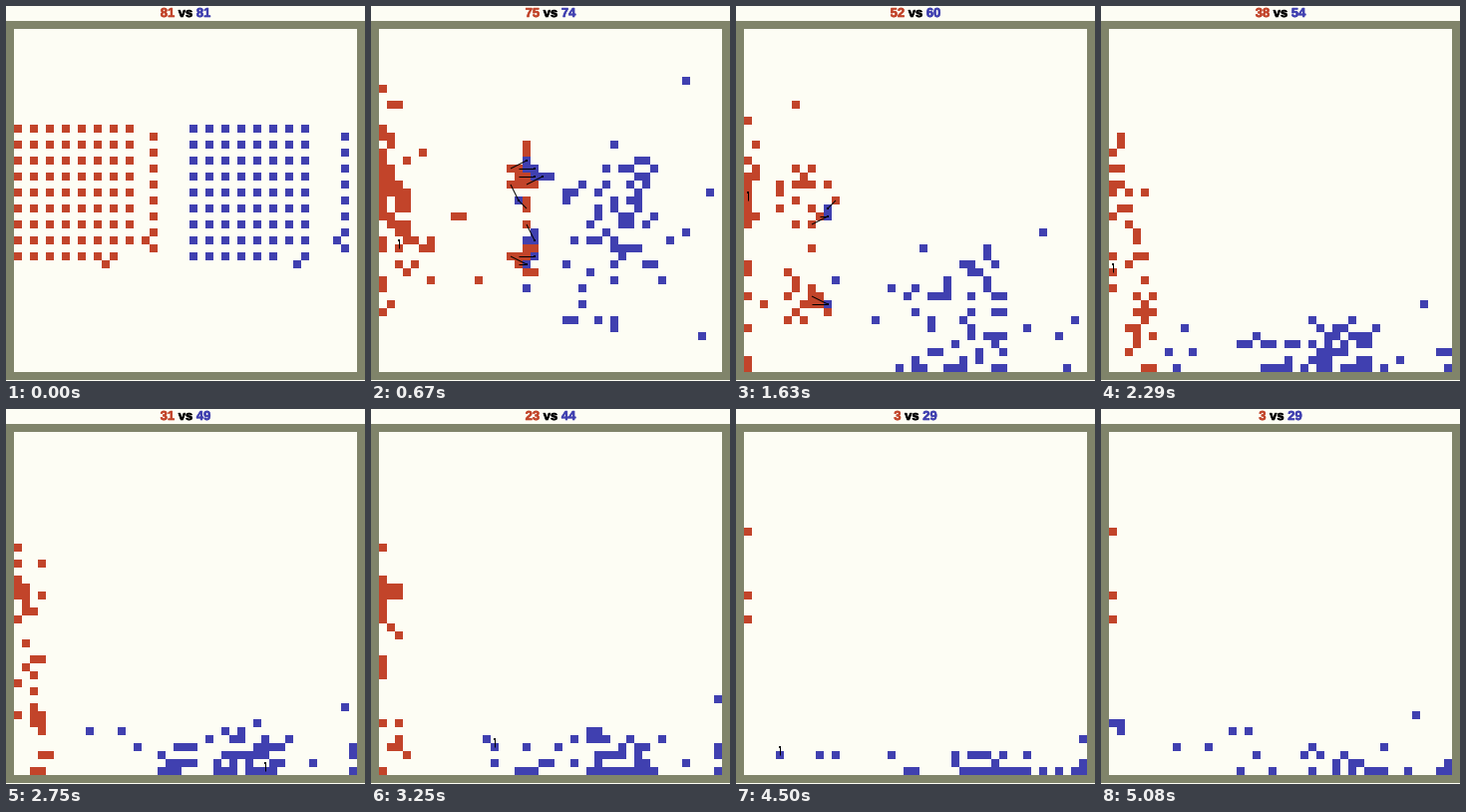
A matplotlib script that plays this animation: 360x376 px, repeating every 5120 ms.

```python
import math
import random

import matplotlib.pyplot as plt
import numpy as np
from matplotlib import patheffects
from matplotlib.animation import FuncAnimation
from matplotlib.collections import LineCollection
from matplotlib.colors import to_rgb
from matplotlib.patches import Rectangle

W, H, DPI = 360, 376, 100
CELL, GRID, LEFT, TOP = 8, 43, 8, 23
RED, BLUE, PAPER, WALL = "#c2442a", "#4040b0", "#fdfdf4", "#80846a"
FRAMES, INTERVAL = 256, 20
TICK, LAST = 1000 / 24, 122
rng = random.Random(11)

# Course of the battle at a few key ticks
KEYS = [0, 16, 39, 55, 78, 94, 108, 122]


def course(*values):
    return lambda t: float(np.interp(t, KEYS, values))


# Front line: centre of its upper and lower wing, and spread
FRONT_X = course(17, 17.4, 7.6, 4.3, 2, 2.5, 2, 0)
FRONT_Y = (course(18, 19.5, 21, 37, 39.5, 41.4, 41, 38),
           course(26, 28, 32.5, 40, 40.5, 41.6, 41, 39))
FRONT_SX = course(0.8, 0.8, 1.4, 1, 1, 1.1, 1, 1.2)
FRONT_SY = course(2.3, 2.3, 2, 2, 1.5, 0.5, 1, 2.5)


class Army:
    """Units in order of death; the next few fight, the others keep to camp."""

    def __init__(self, start, side, left, fighters, camp, stand=()):
        start = sorted(start, key=lambda p: side * p[0] + rng.gauss(0, 1))
        self.left, self.fighters, self.camp, self.side = left, fighters, camp, side
        self.pos = start
        self.wing = [int(y > 20) for x, y in start]
        xy = np.array(start, float)
        z = (xy - xy.mean(0)) / xy.std(0)
        self.bias = [(0.6 * a + rng.gauss(0, 0.8), 0.6 * b + rng.gauss(0, 0.8))
                     for a, b in z]
        self.post = dict(zip(range(len(start) - len(stand), len(start)), stand))

    def first(self, t):
        return len(self.pos) - round(self.left(t))

    def alive(self, t):
        return self.pos[self.first(t):]

    def goal(self, i, t):
        """Where unit i wants to be, and its urge to roam."""
        gx, gy = self.bias[i]
        if i - self.first(t) < self.fighters(t):
            x = FRONT_X(t) + 1.5 * (self.side > 0) + FRONT_SX(t) * gx
            return x, FRONT_Y[self.wing[i]](t) + FRONT_SY(t) * gy, 0
        cx, cy, sx, sy = (f(t) for f in self.camp)
        y = self.post.get(i, cy + sy * gy)
        return cx + sx * gx, y, 0.2 * min(1, sx)


def clamp(v):
    return min(GRID - 1, max(0, round(v)))


def sign(v):
    return (v > 0) - (v < 0)


def phalanx(x0, last, gap, loose):
    """Nine by nine block whose last column and one corner have just set off."""
    block = [(x0 + 2 * i, 12 + 2 * j) for i in range(8) for j in range(9)]
    block.remove((x0 + gap, 28))
    block += [(last, 13 + 2 * j) for j in range(8)]
    return block + [(last - 1, 26), (x0 + loose, 29)]


red = Army(
    phalanx(0, 17, 14, 11), -1,
    left=course(81, 75, 52, 38, 23, 11, 3, 3),
    fighters=course(24, 24, 34, 16, 9, 7, 0, 0),
    camp=(course(2, 2, 0, 2.5, 0.6, 0, 0, 0),
          course(21, 22, 26, 21, 25, 20, 18, 18),
          course(3, 2.8, 0.4, 2.8, 1.2, 0, 0, 0),
          course(6, 6.5, 10, 5, 7, 6, 6, 6)),
    stand=(29, 12, 20, 23))
blue = Army(
    phalanx(22, 41, 12, 13), 1,
    left=course(81, 74, 60, 54, 44, 31, 29, 29),
    fighters=course(15, 15, 7, 6, 3, 3, 5, 10),
    camp=(course(31, 28.5, 26, 25, 25, 27, 25, 23),
          course(20, 25.5, 39, 41, 41, 42, 42, 42),
          course(6, 5, 6, 7.5, 9, 9.5, 9.5, 9.5),
          course(5.5, 7, 4, 2.6, 2.3, 1.3, 1.3, 1.3)))


def advance(t):
    """Move every living unit by at most one cell, never onto another."""
    taken = set(red.alive(t) + blue.alive(t))
    queue = [(a, i) for a in (red, blue) for i in range(a.first(t), len(a.pos))]
    rng.shuffle(queue)
    for army, i in queue:
        x, y = army.pos[i]
        gx, gy, roam = army.goal(i, t)
        dx, dy = sign(clamp(gx) - x), sign(clamp(gy) - y)
        if rng.random() < roam:
            dx, dy = rng.randint(-1, 1), rng.randint(-1, 1)
        for step in ((dx, dy), (dx, 0), (0, dy)):
            cell = clamp(x + step[0]), clamp(y + step[1])
            if cell not in taken:
                taken.remove((x, y))
                taken.add(cell)
                army.pos[i] = cell
                break


def centre(p):
    return LEFT + CELL * (p[0] + 0.5), TOP + CELL * (p[1] + 0.5)


def strikes(t, reds, blues):
    """Thin strokes between opponents within reach, now and then a stray one."""
    out = []
    for r in reds:
        near = [b for b in blues if math.dist(r, b) < 2.3]
        if near and rng.random() < 0.4:
            out.append((centre(r), centre(rng.choice(near))))
    if t > 8 and rng.random() < 0.6:
        x, y = centre(rng.choice(reds + blues))
        out.append(((x, y), (x, y - CELL)))
    return out


history = []
for t in range(LAST + 1):
    if t:
        advance(t)
    reds, blues = red.alive(t), blue.alive(t)
    history.append((reds, blues, strikes(t, reds, blues)))

fig = plt.figure(figsize=(W / DPI, H / DPI), dpi=DPI, facecolor=PAPER)
ax = fig.add_axes([0, 0, 1, 1])
ax.axis("off")
ax.add_patch(Rectangle((0, 15), W, 360, fc=WALL, lw=0, antialiased=False))
field = ax.imshow(np.ones((GRID, GRID, 3)), interpolation="nearest", aspect="auto",
                  extent=(LEFT, LEFT + GRID * CELL, TOP + GRID * CELL, TOP), zorder=2)
ax.set(xlim=(0, W), ylim=(H, 0))
PX = 72 / DPI
lines = ax.add_collection(LineCollection([], colors="black", linewidths=PX, zorder=3))
dots, = ax.plot([], [], "s", color="black", ms=2 * PX, mew=0, zorder=4)

EM = 13


def label(text, color, ha):
    heavy = [patheffects.withStroke(linewidth=0.6 * PX, foreground=color)]
    return ax.text(0, 11, text, color=color, ha=ha, va="baseline", size=EM * PX,
                   family="Liberation Sans", weight="bold", path_effects=heavy)


score_red = label("", RED, "right")
versus = label("vs", "black", "center")
score_blue = label("", BLUE, "left")


def show_score(a, b):
    a, b = str(a), str(b)
    mid = W / 2 + (len(a) - len(b)) * 0.278 * EM
    gap = (0.556 + 0.278) * EM
    versus.set_x(mid)
    score_red.set(x=mid - gap, text=a)
    score_blue.set(x=mid + gap, text=b)


def draw(i):
    reds, blues, hits = history[min(LAST, int((i * INTERVAL + 15) / TICK))]
    img = np.full((GRID, GRID, 3), to_rgb(PAPER))
    for units, color in ((reds, RED), (blues, BLUE)):
        for x, y in units:
            img[y, x] = to_rgb(color)
    field.set_data(img)
    lines.set_segments(hits)
    dots.set_data([h[1][0] for h in hits], [h[1][1] for h in hits])
    show_score(len(reds), len(blues))
    return field, lines, dots, score_red, versus, score_blue


anim = FuncAnimation(fig, draw, frames=FRAMES, interval=INTERVAL,
                     init_func=lambda: draw(0), repeat=True, repeat_delay=0, blit=False)
plt.show()
```
